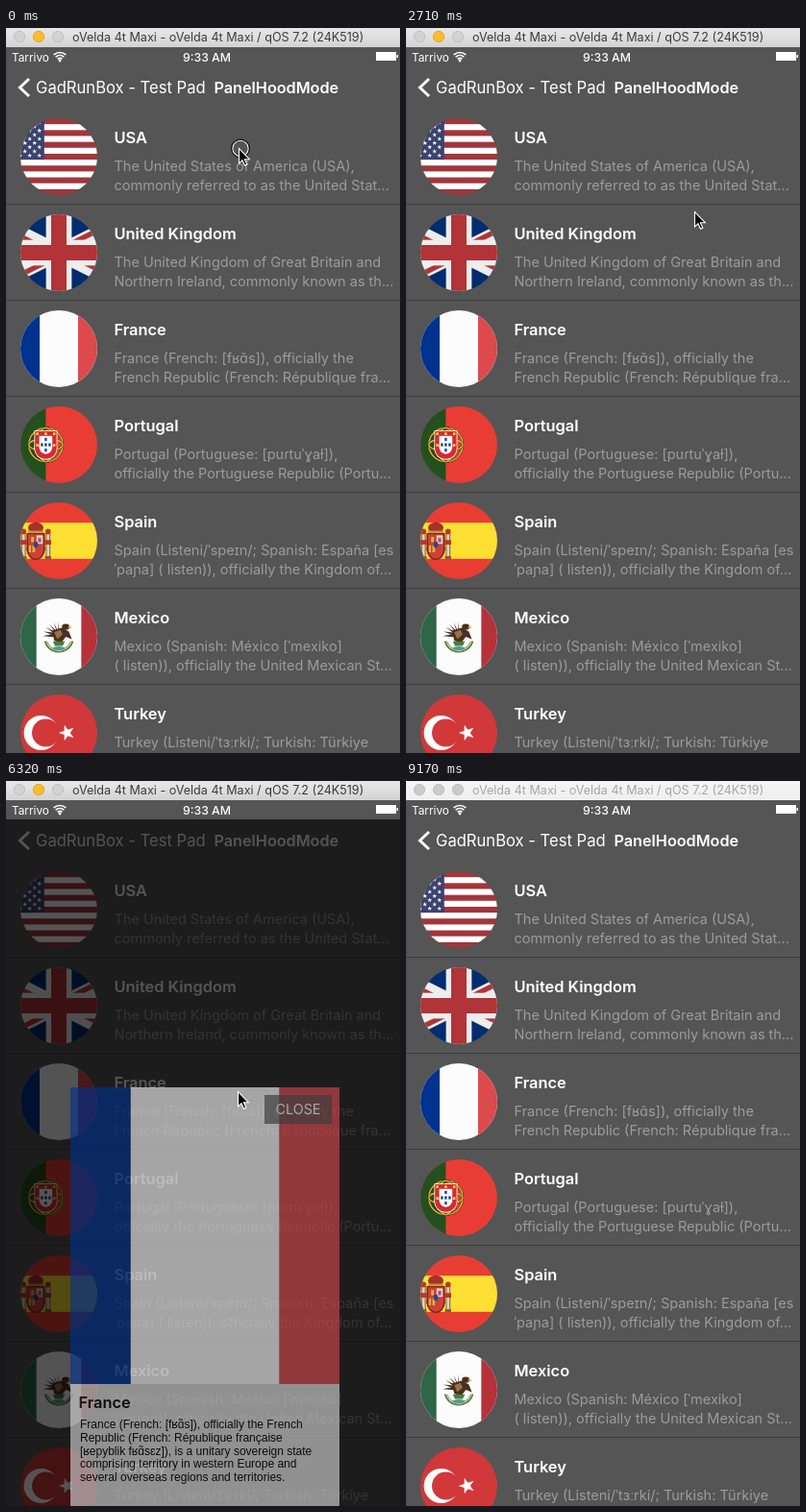
An HTML page with a canvas that plays this animation: 410 px wide and 755 px high, repeating every 9220 ms.

```html
<!DOCTYPE html>
<html lang="en">
<head>
<meta charset="utf-8">
<style>
  html, body { margin: 0; width: 410px; height: 755px; overflow: hidden; background: #555; }
  canvas { display: block; }
</style>
</head>
<body>
<canvas id="stage" width="410" height="755"></canvas>
<script>
const LOOP = 9220, UI = 'Inter, "Noto Sans", "DejaVu Sans", sans-serif';
const BODY = '"Liberation Sans", Arial, "DejaVu Sans", sans-serif';
const makeLayer = (w, h) => Object.assign(document.createElement('canvas'), { width: w, height: h }).getContext('2d');
const stage = document.getElementById('stage').getContext('2d');
const backdrop = makeLayer(410, 755), card = makeLayer(280, 460);
let g = stage;

function box(color, x, y, w, h) {
  g.fillStyle = color;
  g.fillRect(x, y, w, h);
}
function disc(color, x, y, rx, ry = rx) {
  g.fillStyle = color;
  g.beginPath();
  g.ellipse(x, y, rx, ry, 0, 0, 7);
  g.fill();
}
function ring(color, x, y, rx, width, ry = rx, from = 0, to = 2 * Math.PI) {
  g.strokeStyle = color;
  g.lineWidth = width;
  g.beginPath();
  g.ellipse(x, y, rx, ry, 0, from, to);
  g.stroke();
}
function poly(color, ...points) {
  g.fillStyle = color;
  g.beginPath();
  for (let i = 0; i < points.length; i += 2) g.lineTo(points[i], points[i + 1]);
  g.closePath();
  g.fill();
}
function star(x, y, r, turn = -Math.PI / 2) {
  const points = [];
  for (let i = 0; i < 10; i++) {
    const a = turn + i * Math.PI / 5, d = i % 2 ? r * 0.382 : r;
    points.push(x + d * Math.cos(a), y + d * Math.sin(a));
  }
  poly('#fff', ...points);
}
function label(text, x, y, size, color, weight = 400, family = UI, align = 'left') {
  g.font = `${weight} ${size}px ${family}`;
  g.fillStyle = color;
  g.textAlign = align;
  g.fillText(text, x, y);
}

// Flags are 100 units high around the origin.
function tricolor(left, right, edge = 25) {
  box('#fcfcfc', -50, -50, 100, 100);
  box(left, -50, -50, 50 - edge, 100);
  box(right, edge, -50, 50 - edge, 100);
}
function usa() {
  const stripe = 100 / 13;
  box('#a1363d', -50, -50, 100, 100);
  for (let i = 1; i < 13; i += 2) box('#fff', -50, -50 + i * stripe, 100, stripe);
  box('#3c426f', -50, -50, 31, 7 * stripe);
  for (let row = 1; row < 10; row++)
    for (let col = 2 - row % 2; col < 6; col += 2)
      star(-19 - 6.3 * col, -50 + 5.38 * row, 3.2);
}
function uk() {
  const white = '#ededed', red = '#b03438';
  box('#002c70', -50, -50, 100, 100);
  for (const s of [1, -1]) {
    poly(white, -100, s * -50 - 11.2, 100, s * 50 - 11.2, 100, s * 50 + 11.2, -100, s * -50 + 11.2);
  }
  for (const s of [1, -1]) {
    poly(red, 0, 0, -100 * s, -50 * s, -100 * s, -42.5 * s, 0, 7.5 * s);
    poly(red, 0, 0, 100 * s, -50 * s, 100 * s, -57.5 * s, 0, -7.5 * s);
  }
  box(white, -16.7, -50, 33.4, 100);
  box(white, -50, -16.7, 100, 33.4);
  box(red, -10, -50, 20, 100);
  box(red, -50, -10, 100, 20);
}
function france() { tricolor('#00328f', '#dc4a4e'); }
function shield(color, x, y, w, h) {
  box(color, x - w / 2, y - h / 2, w, h * 0.65);
  disc(color, x, y + h * 0.13, w / 2, h * 0.4);
}
function portugal() {
  const x = -17;
  box('#e83d35', -50, -50, 100, 100);
  box('#24501f', -50, -50, 33, 100);
  for (const [rx, ry] of [[22, 22], [22, 8], [11, 22]]) {
    ring('#3a2f12', x, 0, rx, 3, ry);
    ring('#d9b93a', x, 0, rx, 1.8, ry);
  }
  shield('#fff', x, 0, 30, 37);
  shield('#d52b2b', x, 0, 28, 35);
  for (const dx of [-11, 0, 11]) box('#f3d83f', x + dx - 1.5, -16, 3, 3.5);
  for (const dx of [-11, 11]) box('#f3d83f', x + dx - 1.5, -1, 3, 3.5);
  shield('#fff', x, 0, 17, 23);
  for (const [dx, dy] of [[0, -7], [0, 0], [0, 7], [-5, 0], [5, 0]]) box('#243f94', x + dx - 1.5, dy - 2, 3, 4);
}
function spain() {
  const x = -30;
  box('#e83d33', -50, -50, 100, 100);
  box('#fde033', -50, -23.5, 100, 47);
  for (const dx of [-16, 16]) {
    box('#8c5a3a', x + dx - 3, -10, 6, 33);
    box('#d9d2c0', x + dx - 1.8, -9, 3.6, 30);
    box('#b8352d', x + dx - 4, -1, 8, 6);
    box('#8c5a2c', x + dx - 4, 20, 8, 4);
    disc('#b8352d', x + dx, -12, 3.5);
  }
  disc('#a5322b', x, -17, 10, 7);
  box('#c99a2e', x - 10, -13, 20, 3.5);
  shield('#7c2622', x, 7, 24, 34);
  shield('#cf4038', x, 7, 20, 31);
  box('#eadcd0', x + 1, -7, 8, 11);
  box('#b0506a', x + 3, -4, 4, 6);
  box('#e0b23c', x - 9, 6, 8, 9);
  box('#b0332d', x - 6, 6, 1.5, 9);
  box('#e0b23c', x - 6, -5, 3.5, 7);
  disc('#27488f', x, 5, 3, 4);
}
function mexico() {
  const outline = '#4a3020';
  tricolor('#2e6647', '#b53239', 29.17);
  ring('#5f7f45', 0, 1, 18.5, 2.4, 18.5, 0.25, 2.89);
  ring('#8aa56d', 0, 1, 16, 1.4, 16, 0.3, 2.84);
  for (let i = 0; i < 6; i++) {
    const a = Math.PI + i * 0.32, c = Math.cos(a), s = Math.sin(a);
    poly(outline, -2 - s * 3, -2 + c * 3, -1 + c * 20, -1 + s * 19, 2 + s * 3, -2 - c * 3);
  }
  poly(outline, -9, -8, 4, -12, 13, -7, 17, 3, 9, 0, 3, 8, -6, 5);
  poly('#9b7145', -6, -6, 2, -9, 5, -3, -2, 3);
  disc(outline, 9, -13, 5, 4);
  poly('#d0a848', 13, -15, 17, -12, 12, -11);
  poly('#4f7a3c', -8, 6, 8, 6, 5, 12, -5, 12);
  disc('#4f9b9a', 0, 15, 8, 2.6);
}
function turkey() {
  box('#d0383a', -50, -50, 100, 100);
  disc('#fff', -23, 0, 22.5);
  disc('#d0383a', -17, 0, 18);
  star(10.5, 0, 11, Math.PI);
}

const rows = [
  [usa, 'USA', 'The United States of America (USA),', 'commonly referred to as the United Stat...'],
  [uk, 'United Kingdom', 'The United Kingdom of Great Britain and', 'Northern Ireland, commonly known as th...'],
  [france, 'France', 'France (French: [fʁɑ̃s]), officially the', 'French Republic (French: République fra...'],
  [portugal, 'Portugal', 'Portugal (Portuguese: [puɾtuˈɣaɫ]),', 'officially the Portuguese Republic (Portu...'],
  [spain, 'Spain', 'Spain (Listeni/ˈspeɪn/; Spanish: España [es', 'ˈpaɲa] ( listen)), officially the Kingdom of...'],
  [mexico, 'Mexico', 'Mexico (Spanish: México [ˈmexiko]', '( listen)), officially the United Mexican St...'],
  [turkey, 'Turkey', 'Turkey (Listeni/ˈtɜːrki/; Turkish: Türkiye', '']
];
const stories = [
  `The United States of America (USA), commonly
referred to as the United States (U.S.) or
America, is a federal republic composed of 50
states, the federal district of Washington, D.C.,
five major territories, and various possessions.`,
  `The United Kingdom of Great Britain and
Northern Ireland, commonly known as the
United Kingdom (UK) or Britain, is a sovereign
state in Europe. Lying off the north-western
coast of the European mainland, it includes the
island of Great Britain (the name of which is also
loosely applied to the whole country), the north-
eastern part of the island of Ireland and many`,
  `France (French: [fʁɑ̃s]), officially the French
Republic (French: République française
[ʁepyblik fʁɑ̃sɛz]), is a unitary sovereign state
comprising territory in western Europe and
several overseas regions and territories.`
];
const modals = [{ open: 490, close: 2280 }, { open: 3230, close: 4690 }, { open: 5887, close: 7400 }];
const presses = [[0, 20], [2130, 2280], [3130, 3240], [4630, 4690], [5740, 5890], [7340, 7400]];
const pointer = [
  [0, 242, 125], [1670, 242, 125], [1880, 300, 191], [2960, 300, 191], [3130, 299, 232],
  [4100, 299, 232], [4420, 195, 67], [5270, 195, 67], [5280, 194, 59], [5740, 241, 323],
  [6640, 241, 323], [7130, 377, 353], [7560, 377, 353], [7800, 400, 765], [8510, 400, 765],
  [8520, 398, 750], [8580, 420, 752], [8765, 420, 752], [8770, 400, 750], [8950, 348, 750],
  [8960, 348, 765], [LOOP, 348, 765]
];

const clamp = v => Math.max(0, Math.min(1, v));
// Same curve as the CSS ease-in-out timing.
function easeInOut(x) {
  let lo = 0, hi = 1;
  for (let i = 0; i < 16; i++) {
    const s = (lo + hi) / 2;
    if (((0.52 * s - 0.78) * s + 1.26) * s < x) lo = s; else hi = s;
  }
  return lo * lo * (3 - 2 * lo);
}

function drawFlag(flag, x, y, height) {
  g.save();
  g.translate(x, y);
  g.scale(height / 100, height / 100);
  flag();
  g.restore();
}
function drawStatusBar() {
  label('Tarrivo', 6, 34.5, 11.8, '#fff');
  for (const r of [3.5, 6.5, 9.5]) ring('#fff', 56, 35, r, 1.7, r, -2.3, -0.84);
  disc('#fff', 56, 34, 1.4);
  label('9:33 AM', 209, 34.5, 12.3, '#fff', 500, UI, 'center');
  box('#fff', 385, 25, 21, 9);
  box('#fff', 406.5, 28, 1.5, 3);
}
function drawBackdrop() {
  g = backdrop;
  box('#555', 0, 0, 410, 755);
  drawStatusBar();
  g.strokeStyle = '#fff';
  g.lineWidth = 3;
  g.beginPath();
  g.moveTo(24, 53);
  g.lineTo(14.5, 62);
  g.lineTo(24, 71);
  g.stroke();
  label('GadRunBox - Test Pad', 31, 68, 16.6, '#fff');
  label('PanelHoodMode', 216.5, 68, 16.2, '#fff', 600);
  rows.forEach(([flag, name, first, second], i) => {
    const y = 84 + 100 * i;
    g.save();
    g.beginPath();
    g.arc(55, y + 50, 40, 0, 7);
    g.clip();
    drawFlag(flag, 55, y + 50, 80);
    g.restore();
    label(name, 112.5, y + 35.5, 16.4, '#fff', 600);
    label(first, 112.5, y + 65, 14.5, '#9c9c9c');
    label(second, 112.5, y + 85, 14.5, '#9c9c9c');
    box('#3e3e3e', 0, y + 99, 410, 1);
  });
}
function drawCard(i, pressed) {
  g = card;
  box('#dcdcdc', 0, 0, 280, 460);
  g.save();
  g.beginPath();
  g.rect(0, 0, 280, 309);
  g.clip();
  drawFlag(rows[i][0], 140, 154.5, 309);
  g.restore();
  box('rgba(85,85,85,.7)', 202, 8, 70, 30);
  label('CLOSE', 237, 28, 14.3, pressed ? '#a0a0a0' : '#fff', 400, UI, 'center');
  label(rows[i][1], 8.5, 334, 16.4, '#000', 600);
  stories[i].split('\n').forEach((line, n) => label(line, 10, 355 + 13.8 * n, 12, '#000', 400, BODY));
  g = stage;
}
function drawModal({ open, close }, i, t) {
  if (t < open || t > close + 430) return;
  const dim = Math.min(clamp((t - open) / 200), 1 - clamp((t - close - 230) / 200));
  const shown = t < close ? easeInOut(clamp((t - open - 213) / 390)) : 1 - easeInOut(clamp((t - close) / 350));
  box(`rgba(0,0,0,${0.67 * dim})`, 0, 40, 410, 715);
  drawCard(i, i === 0 && t >= 2130);
  g.globalAlpha = shown;
  g.drawImage(card.canvas, 67, Math.round(168 + 390 * (1 - shown)));
  g.globalAlpha = 1;
}
function drawTitleBar(active) {
  const shade = g.createLinearGradient(0, 0, 0, 20);
  shade.addColorStop(0, active ? '#e8e8e8' : '#f4f4f4');
  shade.addColorStop(1, active ? '#d3d3d3' : '#f0f0f0');
  box(shade, 0, 0, 410, 20);
  [14, 34, 54].forEach((x, i) => {
    const lit = active && i === 1;
    disc(lit ? '#fdbc2f' : active ? '#d2d2d2' : '#cbcbcb', x, 9, 6);
    ring(lit ? '#dfa023' : '#bcbcbc', x, 9, 5.6, 0.8);
  });
  label('oVelda 4t Maxi - oVelda 4t Maxi / qOS 7.2 (24K519)', 69, 14, 12.6, active ? '#3c3c3c' : '#a6a6a6');
}
function drawPointer(t) {
  const n = pointer.findIndex(p => p[0] > t);
  const [t0, x0, y0] = pointer[n - 1], [t1, x1, y1] = pointer[n], k = (t - t0) / (t1 - t0);
  g.save();
  g.translate(x0 + (x1 - x0) * k, y0 + (y1 - y0) * k);
  if (presses.some(([from, to]) => t >= from && t < to)) {
    ring('#fff', 2, 0.5, 8.3, 1.2);
    ring('#111', 2, 0.5, 9.4, 1.2);
  }
  poly('#000', 0.5, 0.5, 0.5, 16, 4, 12.7, 6.4, 18.3, 8.8, 17.3, 6.4, 11.7, 11.3, 11.7);
  g.strokeStyle = '#fff';
  g.lineWidth = 1.1;
  g.stroke();
  g.restore();
}

drawBackdrop();
g = stage;
function frame() {
  const t = performance.now() % LOOP;
  g.drawImage(backdrop.canvas, 0, 0);
  modals.forEach((modal, i) => drawModal(modal, i, t));
  drawTitleBar(t < 9170);
  drawPointer(t);
  requestAnimationFrame(frame);
}
frame();
</script>
</body>
</html>
```
